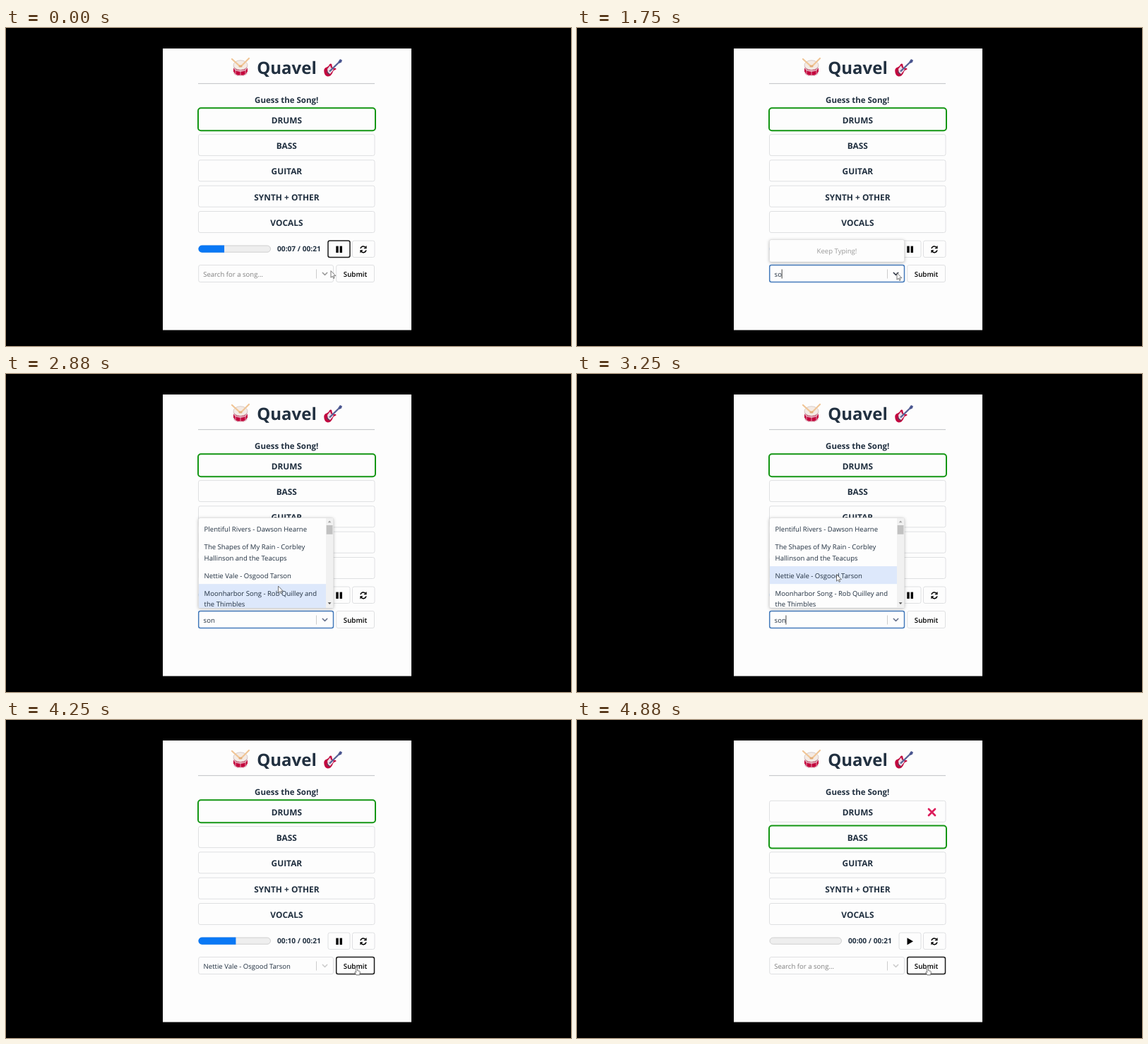
An HTML page for the animation above (5.01 s loop, 800x450 px).

```html
<!DOCTYPE html>
<html lang="en">
<head>
<meta charset="utf-8">
<title>Song guessing game</title>
<style>
html, body { margin: 0; height: 100%; overflow: hidden; background: #000; }
svg { display: block; width: 100vw; height: 100vh; }
text { font: 9.57px "Open Sans", "Noto Sans", sans-serif; fill: #213040; text-rendering: geometricPrecision; white-space: pre; }
.mid { text-anchor: middle; }
.bold { font-weight: 700; }
.menu { filter: drop-shadow(0 1px 2px #0004); }
</style>
</head>
<body>
<svg id="stage" viewBox="0 0 800 450"></svg>
<script>
const LOOP = 5010, STEP = 125, LAST = 39;
// Steps at which the interface changes
const OPEN = 4, KEYS = [10, 13, 16], PICK = 27, PRESS = 34, RESULT = 36, NEXT = 38;
const TRACKS = ['DRUMS', 'BASS', 'GUITAR', 'SYNTH + OTHER', 'VOCALS'];
const CHOICE = 'Nettie Vale - Osgood Tarson';
const OPTIONS = [
  { y: 206, h: 25.5, lines: ['Plentiful Rivers - Dawson Hearne'] },
  { y: 231.5, h: 40.5, lines: ['The Shapes of My Rain - Corbley', 'Hallinson and the Teacups'] },
  { y: 272, h: 25.2, lines: [CHOICE] },
  { y: 297.2, h: 33.8, lines: ['Moonharbor Song - Rob Quilley and', 'the Thimbles'] }
];
// Pointer path: step, x, y
const PATH = [[0, 460, 344], [3, 453, 347], [20, 453, 347], [23, 385.5, 300.5],
  [26, 367.5, 284], [30, 367.5, 284], [33, 496.5, 350], [LAST, 496.5, 350]];

const rect = (x, y, w, h, fill, stroke = 'none', width = 1, r = 0) =>
  `<rect x="${x}" y="${y}" width="${w}" height="${h}" rx="${r}" fill="${fill}" stroke="${stroke}" stroke-width="${width}"/>`;
const path = (d, fill, stroke = 'none', width = 1, extra = '') =>
  `<path d="${d}" fill="${fill}" stroke="${stroke}" stroke-width="${width}" ${extra}/>`;
const text = (s, x, y, style = '', cls = '') =>
  `<text x="${x}" y="${y}" class="${cls}" style="${style}">${s}</text>`;
const box = (x, y, w, h, focus) =>
  rect(x, y, w, h, '#fdfdfd', focus || '#dfe0e2', focus ? 1.5 : 1, 2.5);

function pointer(n) {
  const i = Math.max(1, PATH.findIndex(p => p[0] >= n));
  const [a, ax, ay] = PATH[i - 1], [b, bx, by] = PATH[i];
  const k = (n - a) / (b - a);
  return [ax + (bx - ax) * k, ay + (by - ay) * k];
}

const round = 'stroke-linecap="round" stroke-linejoin="round"';

const drum =
  path('M322 53V62Q323 68 332 68T342 62V53Z', '#c4083e') +
  path('M322 54Q323 61 332 61T342 54M322 62Q323 67.5 332 67.5T342 62', 'none', '#e9dfe0', 1.3) +
  path('M325 59V66M332 61V68M339 59V66', 'none', '#e6b9c3', .8) +
  '<ellipse cx="332" cy="52.5" rx="10" ry="6.7" fill="#f4ebe5" stroke="#d9ccc8"/>' +
  path('M320 44 331 54M344 43 333 54', 'none', '#f0c596', 2.2, round) +
  path('M331 54h.1M333 54h-.1', 'none', '#e3ad78', 3, round);

const guitar =
  path('M450.5 63Q449 57 454 55.5 457 54.5 458 51.5 460 49.5 461.5 52 461 55 464 57 468 56 467.5 58.5 463 60 462.5 63 460 69 455 68.5 451.5 67.5 450.5 63Z', '#c2083f') +
  path('M455 58 459 53 460 56 464 59 459 65 456 64Z', '#eadfe8') +
  path('M458 61.5 472 48', 'none', '#596397', 2.4) +
  path('M470.5 47.5 473 44 476 45.5 475 48.5 472 50Z', '#4a568f') +
  path('M454.5 62 458 65.5', 'none', '#55425f', 1.3, round);

const heading =
  rect(222, 29, 352, 398.5, '#fdfdfd') + drum + guitar +
  text('Quavel', 397.5, 65, 'font-size:24px', 'mid bold') +
  rect(272, 78, 250, 1.2, '#c9cbce') +
  text('Guess the Song!', 397.2, 105.5, 'font-size:11.5px', 'mid bold');

function tracks(n) {
  const active = n >= NEXT ? 1 : 0;
  const row = (name, i) => {
    const y = 114.3 + 36.3 * i;
    return (i === active ? rect(272, y - 1, 251, 32, '#fdfdfd', '#149614', 2, 4) : box(272.5, y, 249.5, 30)) +
      text(name, 397.4, y + 20.3, 'font-size:11.9px', 'mid bold');
  };
  const cross = path('M498 126 507 135M507 126 498 135', 'none', '#dc1d5b', 2.7, round);
  return TRACKS.map(row).join('') + (n >= RESULT ? cross : '');
}

function player(n) {
  const done = n >= RESULT;
  const sec = done ? 0 : 7.5 + n * .1;
  const clock = '00:' + String(Math.floor(sec)).padStart(2, '0');
  const icon = done ? path('M467.5 308.3V318.3L476 313.3Z', '#000')
    : rect(467.3, 308.6, 3.4, 9.4, '#000') + rect(472.6, 308.6, 3.4, 9.4, '#000');
  const fill = 101 * sec / 21;
  return rect(273, 308, 101.5, 9.2, '#eee', '#cfcfcf', 1, 4.6) +
    (fill ? path(`M${273 + fill} 307.5H277.5A5 5 0 0 0 277.5 317.7H${273 + fill}Z`, '#0a78f5') : '') +
    text(clock + ' / 00:21', 384, 316.3, 'font-size:10.2px', 'bold') +
    box(456, 301, 31, 23.5, n < OPEN && '#1b1b1b') + icon +
    box(490.5, 301, 31.5, 23.5) +
    path('M502 312A4.1 4.1 0 0 1 509 310.3M510 314.4A4.1 4.1 0 0 1 503 316.3', 'none', '#000', 1.5) +
    path('M510.6 308V312.2H506.4ZM501.4 318.5V314.3H505.6Z', '#000');
}

function search(n) {
  const focus = n >= OPEN && n < PRESS;
  const hover = n <= 20;
  const typed = 'son'.slice(0, KEYS.filter(k => n >= k).length);
  const chosen = n >= PICK && n < RESULT;
  const value = chosen ? CHOICE : n < PICK ? typed : '';
  const arrow = focus ? (hover ? '#2f3645' : '#667089') : hover ? '#999' : '#ccc';
  const lastKey = Math.max(OPEN, ...KEYS.filter(k => n >= k));
  const caret = focus && n < PICK && (n - lastKey) % 8 < 4;
  const caretX = 279.6 + [0, 4.6, 10.4, 16.2][typed.length];
  return box(272.7, 335.5, 190.8, 24, focus && '#447abb') +
    (value ? text(value, 279.6, 351.5) : text('Search for a song...', 279.2, 351.5, 'fill:#808080')) +
    (caret ? rect(caretX - .3, 341.5, .9, 13, '#333') : '') +
    rect(439, 341.5, 1, 13, '#ccc') +
    path('M448.3 346.3 451.5 349.5 454.7 346.3', 'none', arrow, 1.6, round) +
    box(467.7, 335.5, 53.8, 24, n >= PRESS && '#1b1b1b') +
    text('Submit', 494.6, 351.6, 'font-size:9.8px;font-weight:600;fill:#000', 'mid');
}

function menu(n, y) {
  if (n < OPEN || n >= PICK) return '';
  const frame = top => `<g class="menu">${rect(272.5, top, 191, 331 - top, '#fdfdfd', '#d8d8d8', .6, 2.5)}</g>`;
  if (n < KEYS[2])
    return frame(299.5) + text('Keep Typing!', 368, 319, 'fill:#999', 'mid');
  const lit = y > 331 ? 0 : y > 297.2 ? 3 : 2;
  const option = (o, i) =>
    (i === lit ? rect(273, o.y, 180, o.h, '#dde8fb') : '') +
    o.lines.map((s, j) => text(s, 280.6, o.y + 16.8 + 15.2 * j)).join('');
  return frame(203.5) +
    `<clipPath id="list">${rect(273, 204, 190.5, 127, '#000')}</clipPath><g clip-path="url(#list)">` +
    OPTIONS.map(option).join('') +
    rect(453, 204, 10.3, 127, '#f1f1f1') + rect(453.7, 214, 8.8, 12.8, '#c1c1c1') +
    path('M455.7 210.3 458.1 207.6 460.5 210.3Z', '#a3a3a3') +
    path('M455.7 323.3 458.1 326 460.5 323.3Z', '#505050') + '</g>';
}

function cursor([x, y]) {
  const shape = x > 467
    ? 'M-1 1Q0-.6 1 1V4.6L4.2 5.4Q5 5.7 4.8 7L4.2 10.8H-.5L-3 7.2Q-3 5.8-1 7Z'
    : 'M0 0V9.2L2.2 7.2 3.7 10.4 5.1 9.8 3.7 6.7H6.5Z';
  return `<g transform="translate(${x} ${y})">${path(shape, '#fff', '#555', .8, round)}</g>`;
}

const stage = document.getElementById('stage');
let shown = -1;

function draw(now) {
  const n = Math.min(LAST, Math.floor(now % LOOP / STEP));
  if (n !== shown) {
    shown = n;
    const at = pointer(n);
    stage.innerHTML = heading + tracks(n) + player(n) + search(n) + menu(n, at[1]) + cursor(at);
  }
  requestAnimationFrame(draw);
}
draw(performance.now());
</script>
</body>
</html>
```
